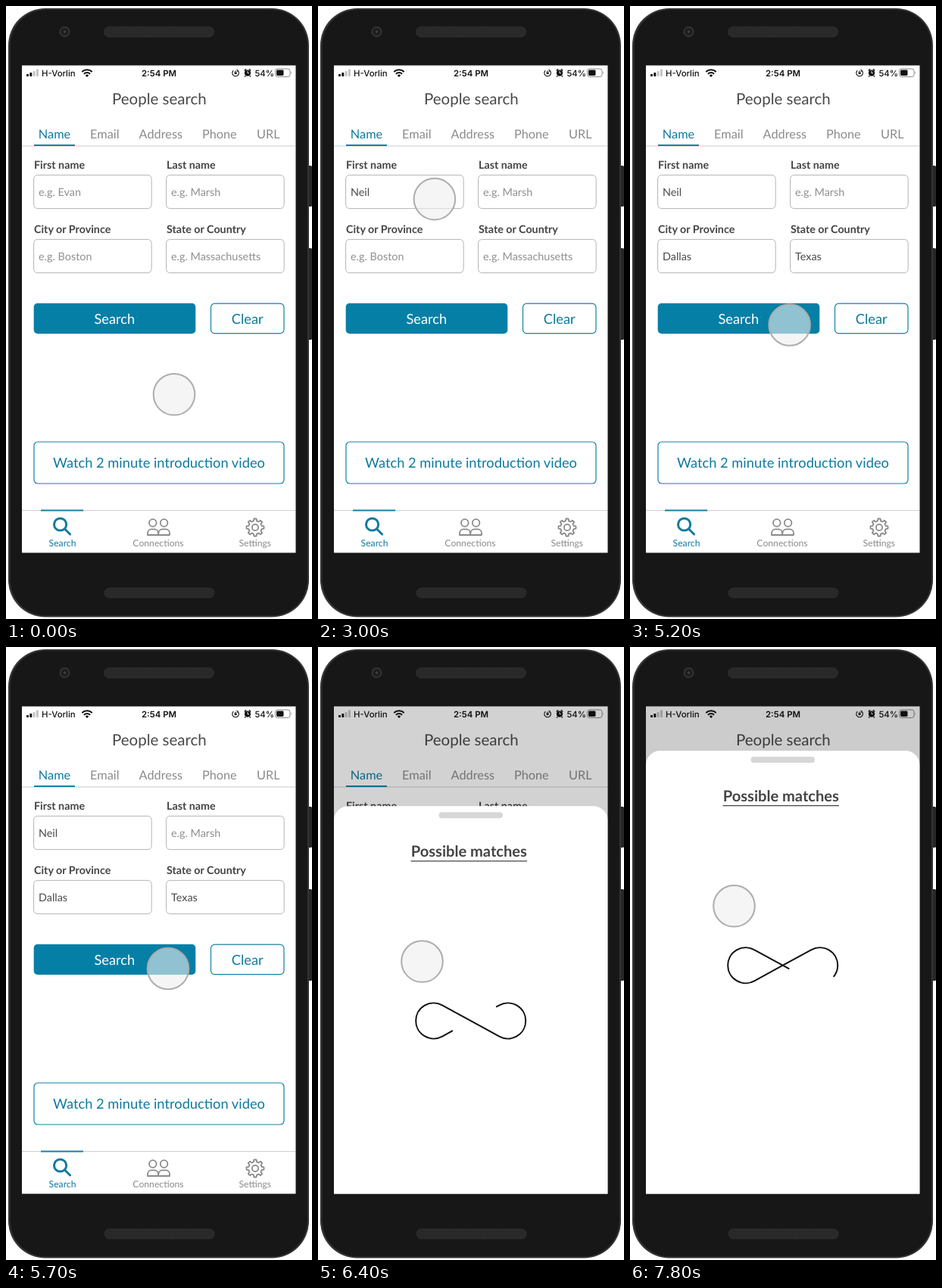
Animation, 404 px wide and 810 px high, one loop 8000 ms. Source, as an HTML page:

```html
<!DOCTYPE html>
<html lang="en">
<head>
<meta charset="utf-8">
<title>People search</title>
<style>
  html, body { margin: 0; width: 100%; height: 100%; overflow: hidden; background: #fff; }
  svg { display: block; width: 404px; height: 810px; }
  text { font-family: Lato, Carlito, sans-serif; fill: #4a4a4a; text-rendering: geometricPrecision; }
  .mid { text-anchor: middle; }
  .title { font-size: 20.5px; }
  .tab { font-size: 16.3px; fill: #8c8c8c; }
  .label { font-size: 14.3px; font-weight: 700; fill: #444; }
  .value { font-size: 14.4px; }
  .hint { fill: #8f8f8f; }
  .button { font-size: 18.3px; }
  .nav { font-size: 12.2px; fill: #8c8c8c; }
  .head { font-size: 20.1px; font-weight: 700; fill: #444; }
  .status text { font-family: Inter, Roboto, sans-serif; font-size: 11.4px; font-weight: 500; fill: #111; }
  .status .clock { font-weight: 600; }
  text.teal { fill: #0e7a9e; }
  .field { fill: #fff; stroke: #b4b4b4; }
  .ghost { fill: #fff; stroke: #1580a5; stroke-width: 1.2; }
  .icon { fill: none; stroke: #8a8a8a; stroke-width: 1.8; stroke-linejoin: round; stroke-linecap: round; }
  .touch { fill: rgba(238, 238, 238, .6); stroke: #adadad; stroke-width: 2; }
</style>
</head>
<body>
<svg viewBox="0 0 404 810">
  <defs>
    <clipPath id="screen"><rect x="21" y="78.5" width="361.5" height="644"/></clipPath>
    <pattern id="mesh" width="3" height="3" patternUnits="userSpaceOnUse">
      <rect width="3" height="3" fill="#2b2b2b"/>
      <circle cx="1.5" cy="1.5" r=".8" fill="#202020"/>
    </pattern>
  </defs>

  <!-- phone -->
  <g fill="#262626">
    <rect x="397" y="211" width="7" height="54" rx="1.5"/>
    <rect x="397" y="320" width="7" height="121" rx="1.5"/>
  </g>
  <rect x="3" y="3" width="397" height="804.5" rx="49" fill="#343434"/>
  <rect x="5.5" y="5" width="392.5" height="800.5" rx="47" fill="#171717"/>
  <g fill="url(#mesh)" stroke="#303030" stroke-width=".8">
    <rect x="129.5" y="27.5" width="145" height="13.5" rx="6.5"/>
    <rect x="130" y="769" width="145" height="13" rx="6.5"/>
  </g>
  <circle cx="77.5" cy="34" r="7.2" fill="#303030"/>
  <circle cx="77.5" cy="34" r="4.6" fill="#191919"/>
  <circle cx="77.5" cy="34" r="2" fill="#3c3c3c"/>

  <g clip-path="url(#screen)">
    <rect x="21" y="78" width="362" height="645" fill="#fff"/>

    <g class="status">
      <g fill="#111">
        <rect x="27" y="90" width="3" height="3" rx=".7"/>
        <rect x="31.3" y="88" width="3" height="5" rx=".7"/>
        <g fill="#c4c4c4">
          <rect x="35.6" y="86" width="3" height="7" rx=".7"/>
          <rect x="39.9" y="83.5" width="3" height="9.5" rx=".7"/>
        </g>
      </g>
      <text x="47" y="92.5">H-Vorlin</text>
      <g fill="none" stroke="#111" stroke-width="2">
        <path d="M100.3 87a9.5 9.5 0 0 1 13.4 0M102.9 89.7a5.8 5.8 0 0 1 8.2 0"/>
        <path d="M107 94l-2.2-2.3a3.1 3.1 0 0 1 4.4 0z" fill="#111" stroke="none"/>
      </g>
      <text class="mid clock" x="202" y="92.5">2:54 PM</text>
      <g fill="none" stroke="#111" stroke-width="1.1">
        <path d="M300.3 85.2a4.3 4.3 0 1 0 5.6 0M304.4 84.2l1.8 .8 -.5 1.9"/>
        <rect x="301.6" y="87.5" width="3" height="2.6" fill="#111" stroke="none"/>
        <path d="M302.1 87.6v-.6a1 1 0 0 1 2 0v.6" stroke-width=".8"/>
      </g>
      <circle cx="319" cy="88.6" r="4.1" fill="#111"/>
      <path d="M314.8 85.5l2.3-2.2M323.2 85.5l-2.3-2.2M316.2 92.3l-1 1.2M321.8 92.3l1 1.2" stroke="#111" stroke-width="1.4"/>
      <path d="M319 86v2.8h2" fill="none" stroke="#fff" stroke-width=".9"/>
      <text x="328.5" y="92.5">54%</text>
      <rect x="355.5" y="83" width="19.5" height="10.5" rx="2.8" fill="none" stroke="#8a8a8a"/>
      <rect x="357" y="84.5" width="9.5" height="7.5" rx="1.4" fill="#111"/>
      <path d="M376.3 86.3q1.6 2 0 4z" fill="#8a8a8a"/>
    </g>

    <text class="title mid" x="202.4" y="129.7">People search</text>
    <g id="tabs"></g>
    <path d="M21 185H382" stroke="#ccc"/>
    <path d="M37 184H91" stroke="#1580a5" stroke-width="2"/>

    <g id="form"></g>

    <rect x="36.7" y="392.7" width="213.6" height="40.3" rx="5" fill="#067fa6"/>
    <text class="button mid" x="143.4" y="419.6" style="fill:#fff">Search</text>
    <rect class="ghost" x="270.5" y="393.2" width="96.5" height="39.4" rx="5"/>
    <text class="button mid teal" x="318.7" y="419.6">Clear</text>
    <rect class="ghost" x="37" y="576" width="330" height="55" rx="5"/>
    <text class="button mid teal" x="202" y="610">Watch 2 minute introduction video</text>

    <path d="M21 666.5H382" stroke="#d0d0d0"/>
    <path d="M46 666.6H102" stroke="#1580a5" stroke-width="2"/>
    <g class="icon">
      <g style="stroke:#1079a0;stroke-width:3">
        <circle cx="71.6" cy="685" r="8.1"/>
        <path d="M77.8 691.2L84.6 698"/>
      </g>
      <circle cx="193.8" cy="683" r="4.8"/>
      <circle cx="208.6" cy="683" r="4.8"/>
      <path d="M187 699v-2.600a5 5 0 0 1 5-5h4a5 5 0 0 1 5 5v2.600zM201.500 699h14.500v-2.600a5 5 0 0 0-5-5h-4.500a5 5 0 0 0-5 5"/>
      <circle cx="329" cy="689" r="4.100"/>
      <path id="gear"/>
    </g>
    <text class="nav mid teal" x="74.500" y="714">Search</text>
    <text class="nav mid" x="201" y="714">Connections</text>
    <text class="nav mid" x="328.800" y="714">Settings</text>

    <circle id="touch" class="touch" r="27.300"/>
    <rect id="dim" x="21" y="78" width="362" height="645" opacity="0"/>

    <g id="sheet">
      <rect x="21" y="137" width="361.500" height="620" rx="19" fill="#fff"/>
      <rect x="159.500" y="145" width="84.500" height="8" rx="4" fill="#d7d7d7"/>
      <text class="head mid" x="199.300" y="204">Possible matches</text>
      <path d="M122.500 209.700H276" stroke="#444" stroke-width="1.200"/>
      <circle class="touch" cx="137.500" cy="342.300" r="27.300"/>
      <path id="loop" transform="translate(201.700 420.700)" pathLength="100"
        d="M0 0L37.700 -20.600A23.500 23.500 0 1 1 37.700 20.600L-37.700 -20.600A23.500 23.500 0 1 0 -37.700 20.600Z"
        fill="none" stroke="#111" stroke-width="2" stroke-dasharray="82.200 17.800"/>
    </g>
  </g>
</svg>

<script>
const LOOP = 8000, STEP = 100;
const $ = id => document.getElementById(id);

function add(parent, tag, attrs, text = '') {
  const el = document.createElementNS('http://www.w3.org/2000/svg', tag);
  for (const k in attrs) el.setAttribute(k, attrs[k]);
  el.textContent = text;
  parent.appendChild(el);
  return el;
}

[['Name', 64], ['Email', 130.3], ['Address', 204.3], ['Phone', 281.8], ['URL', 346.3]]
  .forEach(([name, x], i) =>
    add($('tabs'), 'text', { x, y: 175.3, class: 'tab mid' + (i ? '' : ' teal') }, name));

// label, x, y, hint, typed value, time it is filled in
const fields = [
  ['First name', 37, 223, 'e.g. Evan', 'Neil', 2100],
  ['Last name', 212, 223, 'e.g. Marsh', '', Infinity],
  ['City or Province', 37, 308, 'e.g. Boston', 'Dallas', 4300],
  ['State or Country', 212, 308, 'e.g. Massachusetts', 'Texas', 4300]
].map(([label, x, y, hint, value, at]) => {
  const form = $('form');
  add(form, 'text', { x, y: y - 7.6, class: 'label' }, label);
  add(form, 'rect', { x: x - .4, y: y + .4, width: 155.6, height: 44.2, rx: 5, class: 'field' });
  const el = add(form, 'text', { x: x + 6, y: y + 28, class: 'value hint' }, hint);
  return { el, hint, value, at };
});

const teeth = 8, gear = [];
for (let i = 0; i < teeth; i++) {
  for (const [turn, r] of [[-.3, 8.8], [-.17, 11.6], [.17, 11.6], [.3, 8.8]]) {
    const a = (i + turn) / teeth * 2 * Math.PI;
    gear.push((329 + r * Math.sin(a)).toFixed(2) + ' ' + (689 - r * Math.cos(a)).toFixed(2));
  }
}
$('gear').setAttribute('d', 'M' + gear.join('L') + 'Z');

const clamp = v => Math.min(1, Math.max(0, v));
const inOut = p => p < .5 ? 4 * p ** 3 : 1 - 4 * (1 - p) ** 3;
const out = p => 1 - (1 - p) ** 3;

const home = [222, 513.3];
const moves = [
  [700, 154, 254.6],
  [2900, 137.6, 344.3],
  [4500, 214, 425]
];

function draw(t) {
  let [x, y] = home;
  for (const [start, tx, ty] of moves) {
    const p = inOut(clamp((t - start) / 900));
    x += (tx - x) * p;
    y += (ty - y) * p;
  }
  $('touch').setAttribute('cx', x);
  $('touch').setAttribute('cy', y);

  for (const f of fields) {
    const full = t >= f.at;
    f.el.textContent = full ? f.value : f.hint;
    f.el.classList.toggle('hint', !full);
  }

  const rise = out(clamp((t - 6000) / 800));
  $('dim').setAttribute('opacity', .2 * rise);
  $('sheet').setAttribute('transform', `translate(0 ${586 * (1 - rise)})`);

  const gap = 1.5 + (t - 6400) / 1400 * 136.9;
  $('loop').setAttribute('stroke-dashoffset', -(gap + 8.9));
}

const began = performance.now();
function frame() {
  const t = (performance.now() - began) % LOOP;
  draw(Math.floor(t / STEP) * STEP);
  requestAnimationFrame(frame);
}
frame();
</script>
</body>
</html>
```
